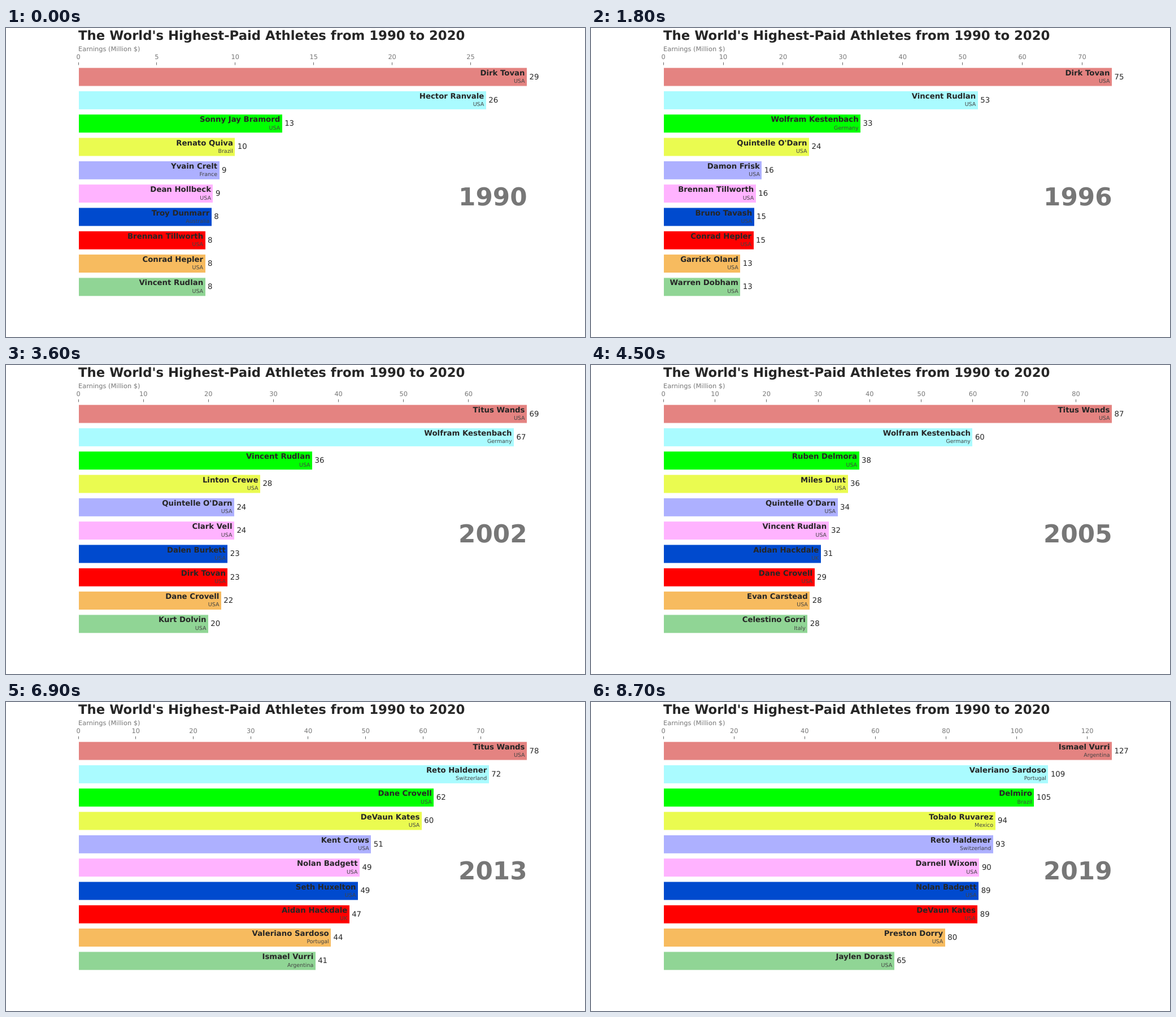
Recreate the animation shown at these times as an HTML page. Size 1025x547 px, loop 9 s.

```html
<!DOCTYPE html>
<html lang="en">
<head>
<meta charset="utf-8">
<title>Highest-Paid Athletes</title>
<style>
  html, body { margin: 0; width: 100%; height: 100%; overflow: hidden; background: #fff; }
  svg { display: block; width: 1025px; height: 547px; }
  text { font-family: "DejaVu Sans", sans-serif; font-size: 13.29px; fill: #262626; text-rendering: geometricPrecision; white-space: pre; }
  .title { font-size: 22.77px; font-weight: bold; }
  .axis { font-size: 11.39px; fill: #777; }
  .mid { text-anchor: middle; }
  .end { text-anchor: end; }
  .name { font-weight: bold; }
  .land { font-size: 9.49px; fill: #444; }
  .year { font-size: 43.65px; font-weight: bold; fill: #777; }
</style>
</head>
<body>
<svg id="chart" viewBox="0 0 1025 547"></svg>
<script>
const STEP = 300, FIRST = 1990, LEFT = 128.1, WIDTH = 794.4, TOP = 86.6, PITCH = 41.31;
const COLORS = ["#e48381", "#aafbff", "#00ff00", "#eafb50", "#adb0ff", "#ffb3ff", "#004ace", "#ff0000", "#f7bb5f", "#90d595"];

const ROSTER = {
  USA: `Dirk Tovan, Hector Ranvale, Sonny Jay Bramord, Dean Hollbeck, Brennan Tillworth, Conrad Hepler,
    Vincent Rudlan, Quintelle O'Darn, Damon Frisk, Bruno Tavash, Garrick Oland, Warren Dobham, Titus Wands,
    Linton Crewe, Clark Vell, Dalen Burkett, Dane Crovell, Kurt Dolvin, Seth Huxelton, DeVaun Kates,
    Cole Thornback Jr., Kent Crows, Nolan Badgett, Jaylen Dorast, Ray Holdrom, Tucker Graith, Darnell Wixom,
    Preston Dorry, Walter Brigson, Ronnell Dace, Ruben Delmora, Grady Pennerwick, Reid Halvon, Wyatt Corbeck,
    Miles Dunt, Evan Carstead, Nathan Lockridge, Terrance Poole, Hugo Manterez, Andy Fenn, Jarrod Stamm, Corwin Braddle`,
  Brazil: "Renato Quiva, Delmiro, Tavinho",
  France: "Yvain Crelt",
  Australia: "Troy Dunmarr",
  Germany: "Wolfram Kestenbach",
  Finland: "Eino Haaskonen",
  UK: "Aidan Hackdale, Alfred Cotwell, Owen Castleton",
  Philippines: "Benny Lacadano",
  Italy: "Celestino Gorri",
  Switzerland: "Reto Haldener",
  Portugal: "Valeriano Sardoso",
  Argentina: "Ismael Vurri",
  Serbia: "Milos Drelkovic",
  Mexico: "Tobalo Ruvarez",
  Canada: "Clinton \"Blade\" Hartock, Brent Lavelski",
  Spain: "Iker Robledal",
  Ireland: "Declan Finroy, Brody Cavern"
};

// Surnames in rank order, then earnings; short lists give the leaders and the last place.
const YEARS = [
  ["Tovan Ranvale Bramord Quiva Crelt Hollbeck Dunmarr Tillworth Hepler Rudlan", [28.6, 26, 13, 10, 9, 8.6, 8.5, 8.1, 8.1, 8.1]],
  ["Tillworth Tovan Rudlan Brigson Quiva Crelt Hartock Hepler Cotwell Hollbeck", [60.5, 31.5, 16, 8.5]],
  ["Rudlan Tillworth Quiva Cotwell Hepler Tavash Corbeck Hollbeck Dunmarr Crelt", [35.9, 28, 8.5]],
  ["Rudlan Dace Quiva Crelt Brigson O'Darn Crewe Corbeck Hepler Hollbeck", [36, 25, 12]],
  ["Rudlan O'Darn Hollbeck Hepler Lavelski Poole Tavash Cotwell Dunmarr Oland", [30.1, 16.7, 11]],
  ["Rudlan Tovan Poole Dace O'Darn Brigson Tavash Hollbeck Kestenbach Lavelski", [43.9, 40, 22.5, 14.5]],
  ["Tovan Rudlan Kestenbach O'Darn Frisk Tillworth Tavash Hepler Oland Dobham", [75, 52.6, 33, 24.4, 16.5, 15.5, 15.2, 15.1, 12.9, 12.9]],
  ["Rudlan Tillworth Delmora Kestenbach Tovan Wands O'Darn Thornback Vell Hepler", [78.3, 54.3, 16]],
  ["Rudlan Kestenbach Lavelski Wands Thornback Vell Delmora O'Darn Oland Hepler", [69, 38, 16]],
  ["Kestenbach Wands Delmora Rudlan Tovan O'Darn Crewe Tillworth Vell Thornback", [49, 47, 18]],
  ["Kestenbach Wands Tovan Rudlan Vell O'Darn Crewe Thornback Burkett Hepler", [59, 53, 19]],
  ["Kestenbach Wands Tovan Rudlan Vell O'Darn Crewe Thornback Crovell Tavash", [59, 53, 20]],
  ["Wands Kestenbach Rudlan Crewe O'Darn Vell Burkett Tovan Crovell Dolvin", [69, 67, 36, 28, 24, 24, 23, 23, 22, 20]],
  ["Wands Kestenbach Rudlan O'Darn Burkett Braddle Vell Crovell Tavash Hackdale", [78, 75, 36, 24]],
  ["Wands Kestenbach Corbeck Rudlan O'Darn Burkett Tavash Hackdale Crewe Crovell", [80.3, 80, 42, 26.1]],
  ["Wands Kestenbach Delmora Dunt O'Darn Rudlan Hackdale Crovell Carstead Gorri", [87, 60, 38, 28]],
  ["Wands Kestenbach Huxelton Rudlan Crovell O'Darn Gorri Tavinho Hackdale Burkett", [90, 58, 27]],
  ["Wands Delmora Huxelton Haaskonen Kestenbach Hackdale Crovell O'Darn Rudlan Tavinho", [100, 43, 31]],
  ["Wands Hackdale Rudlan Huxelton Haaskonen Delmora Crovell Kates Tavinho Haldener", [115, 50, 35]],
  ["Wands Haaskonen Rudlan Crovell Hackdale Lacadano Huxelton Kates Gorri Thornback", [110, 45, 45, 45, 42, 40, 40, 40, 35, 34]],
  ["Wands Pennerwick Crovell Huxelton Hackdale Haldener Kates Lacadano Corbeck Sardoso", [105, 65, 48, 37]],
  ["Wands Crovell Kates Haldener Huxelton Hackdale Sardoso Manterez Vurri Robledal", [75, 53, 32]],
  ["Pennerwick Lacadano Wands Haldener Kates Crovell Huxelton Hackdale Sardoso Corbeck", [85, 62, 42.4]],
  ["Wands Haldener Crovell Kates Crows Badgett Huxelton Hackdale Sardoso Vurri", [78.1, 71.5, 61.9, 59.8, 51, 49, 48.7, 47.2, 44, 41.3]],
  ["Pennerwick Sardoso Kates Vurri Crovell Wands Haldener Huxelton Robledal Halvon", [105, 80, 43.8]],
  ["Pennerwick Lacadano Sardoso Vurri Haldener Kates Dorast Huxelton Wands Crovell", [300, 160, 79.6, 49.5]],
  ["Sardoso Vurri Kates Haldener Dorast Drelkovic Holdrom Huxelton Graith Crovell", [88, 81.4, 77.2, 67.8, 56.2, 55.8, 53.1, 52.9, 52.8, 50]],
  ["Sardoso Kates Vurri Haldener Dorast Fenn Cavern Dorry Stamm Castleton", [93, 86.2, 46]],
  ["Pennerwick Vurri Sardoso Finroy Delmiro Kates Haldener Dorry Halvon Lockridge", [285, 111, 59.5]],
  ["Vurri Sardoso Delmiro Ruvarez Haldener Wixom Badgett Kates Dorry Dorast", [127, 109, 105, 94, 93.4, 89.5, 89.3, 89, 79.8, 65.4]]
];

const people = {};
for (const [land, list] of Object.entries(ROSTER))
  for (const name of list.split(/,\s*/))
    people[name.replace(" Jr.", "").split(" ").pop()] = { name, land };

const chart = document.getElementById("chart");

function add(tag, attrs, content = "") {
  const el = document.createElementNS("http://www.w3.org/2000/svg", tag);
  for (const key in attrs) el.setAttribute(key, attrs[key]);
  el.textContent = content;
  return chart.appendChild(el);
}

function put(el, x, content) {
  el.setAttribute("x", x);
  el.textContent = content;
}

const snap = x => Math.floor(x) + 0.5;

// Ties go to the even number.
function round(v) {
  const low = Math.floor(v);
  return v - low === 0.5 ? low + low % 2 : Math.round(v);
}

function spread(list) {
  if (list.length === 10) return list;
  const head = list.slice(0, -1), last = list[list.length - 1], start = head.length - 1;
  return COLORS.map((_, i) => i <= start ? head[i]
    : last + (head[start] - last) * ((9 - i) / (9 - start)) ** 1.6);
}

function tickStep(max) {
  const raw = max / 9, base = 10 ** Math.floor(Math.log10(raw));
  return base * [1, 2, 2.5, 5, 10].find(m => m * base >= raw - 1e-9);
}

add("text", { class: "title", x: LEFT, y: 21.3 }, "The World's Highest-Paid Athletes from 1990 to 2020");
add("text", { class: "axis", x: LEFT, y: 41 }, "Earnings (Million $)");

const ticks = Array.from({ length: 10 }, () => ({
  mark: add("path", { stroke: "#555", "stroke-width": 0.9 }),
  label: add("text", { class: "axis mid", y: 54.5 })
}));

const bars = COLORS.map((fill, i) => {
  const y = TOP + i * PITCH;
  return {
    rect: add("rect", { x: snap(LEFT), y: y - 16.5, height: 33, fill, stroke: "#fff", "stroke-width": 1 }),
    name: add("text", { class: "name end", y: y - 2.9 }),
    land: add("text", { class: "land end", y: y + 10.4 }),
    value: add("text", { y: y + 3.9 })
  };
});

const yearLabel = add("text", { class: "year end", x: LEFT + WIDTH, y: 314.2 });

function draw(index) {
  const [names, list] = YEARS[index];
  const keys = names.split(" "), values = spread(list), max = values[0], step = tickStep(max);

  ticks.forEach(({ mark, label }, i) => {
    const shown = i * step <= max, x = LEFT + i * step / max * WIDTH;
    mark.setAttribute("d", shown ? `M${snap(x)} 60.8V65.6` : "");
    put(label, x, shown ? i * step : "");
  });

  bars.forEach((bar, i) => {
    const person = people[keys[i]], end = LEFT + values[i] / max * WIDTH;
    bar.rect.setAttribute("width", snap(end) - snap(LEFT));
    put(bar.name, end - 3.97, person.name);
    put(bar.land, end - 3.97, person.land);
    put(bar.value, end + 3.97, round(values[i]));
  });

  yearLabel.textContent = FIRST + index;
}

let current = -1;
const began = performance.now();

function tick() {
  const index = Math.floor(Math.max(0, performance.now() - began) / STEP) % YEARS.length;
  if (index !== current) draw(current = index);
  requestAnimationFrame(tick);
}
tick();
</script>
</body>
</html>
```
